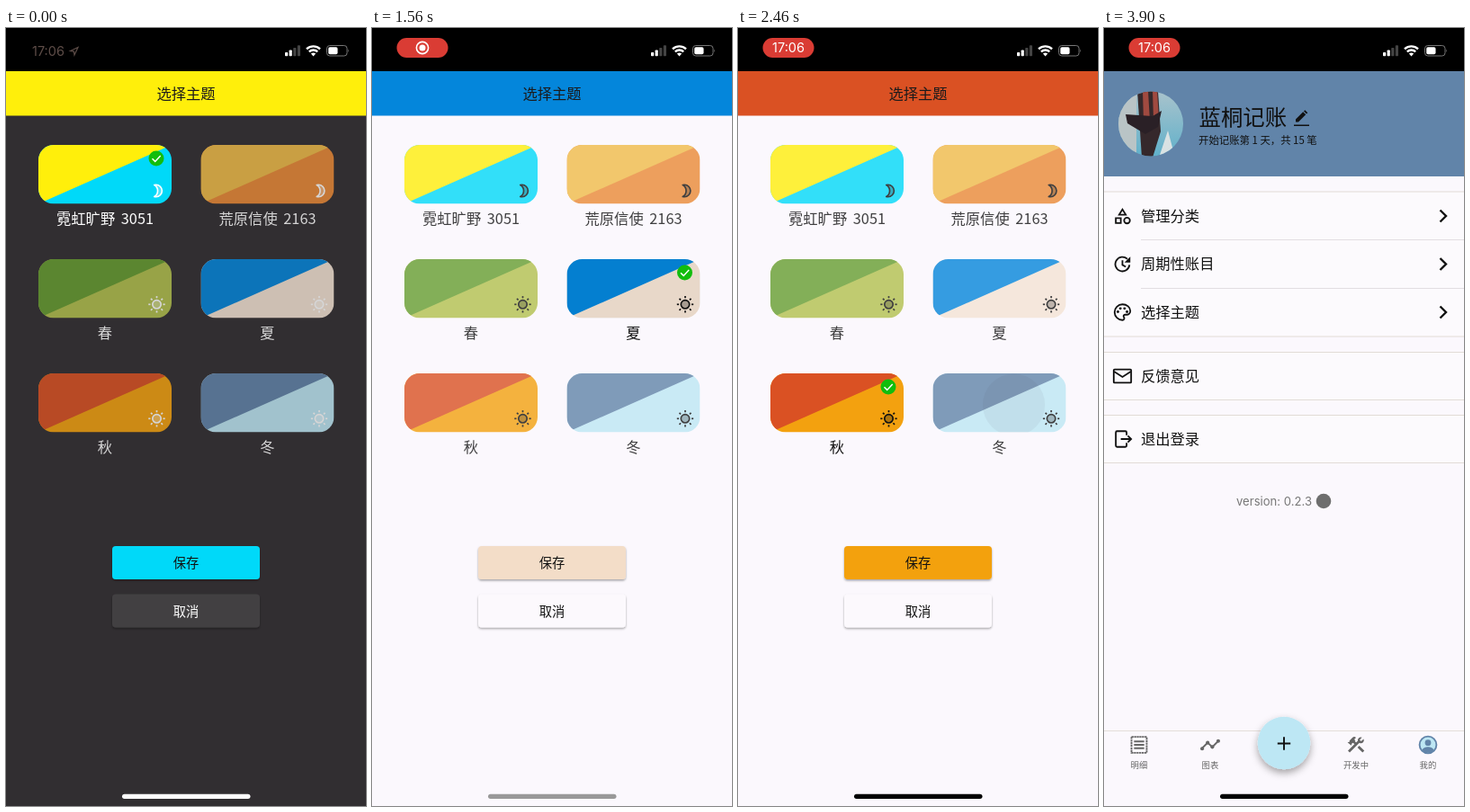
These frames come from a looping animation (400 px wide and 865 px high, 3960 ms). An HTML page:

```html
<!DOCTYPE html>
<html lang="zh-CN">
<head>
<meta charset="utf-8">
<title>选择主题</title>
<style>
html, body { margin: 0; width: 100%; height: 100%; overflow: hidden; background: #000; }
svg { display: block; width: 100%; height: 100%; }
text { font-family: "Noto Sans CJK SC", "Noto Sans CJK", "Noto Sans", sans-serif; font-size: 16.3px; }
.latin { font-family: Inter, Roboto, sans-serif; }
.mid { text-anchor: middle; }
.tile text { word-spacing: 3px; }
.btn { font-size: 14.3px; font-weight: 500; }
.tab { font-size: 9.4px; fill: #666; }
.icon { fill: none; stroke: currentColor; stroke-width: 2; }
.icon .solid { fill: currentColor; stroke: none; }
</style>
</head>
<body>
<svg viewBox="0 0 400 865" preserveAspectRatio="none">
  <defs>
    <clipPath id="tileClip"><rect width="148" height="65.5" rx="17"/></clipPath>
    <clipPath id="saveClip"><rect x="118" y="576" width="164" height="37" rx="4"/></clipPath>
    <clipPath id="avatarClip"><circle cx="52" cy="106.5" r="36"/></clipPath>
    <linearGradient id="sky" x2="0" y2="1"><stop stop-color="#a9c3cc"/><stop offset="1" stop-color="#5fb0ca"/></linearGradient>
    <filter id="soft" x="-30%" y="-30%" width="160%" height="180%">
      <feDropShadow dx="0" dy="1.5" stdDeviation="1.2" flood-opacity=".35"/>
    </filter>
    <filter id="lift" x="-40%" y="-40%" width="180%" height="200%">
      <feDropShadow dx="0" dy="4" stdDeviation="4" flood-opacity=".35"/>
    </filter>
  </defs>

  <g id="home">
    <rect y="48" width="400" height="817" fill="#fbf8fd"/>
    <rect y="48" width="400" height="117" fill="#6184a9"/>
    <g clip-path="url(#avatarClip)">
      <rect x="16" y="70" width="72" height="74" fill="url(#sky)"/>
      <path d="M16 70h20v74H16z" fill="#b9c4c6"/>
      <path d="M37 70h23l3 45-9 29H42z" fill="#35282b"/>
      <path d="M43 70h6l2 34h-7zM54 70h5l2 32h-6z" fill="#a04a40"/>
      <path d="M24 96l30 2 10-6-4 18-14 8-20-12z" fill="#2a2026"/>
      <path d="M61 144l10-30 8 30z" fill="#d9e2e3"/>
    </g>
    <text x="105.5" y="107.5" style="font-size:24.4px" fill="#111">蓝桐记账</text>
    <path d="M213 104.500v-3l8.200-8.200 3 3-8.200 8.200zM222 92.500l1.300-1.300 3 3-1.300 1.300zM211 107.500h17v1.500h-17z" fill="#111"/>
    <text x="105" y="129" style="font-size:11.4px" fill="#111">开始记账第 1 天，共 15 笔</text>
    <g id="menu"></g>
    <text x="147" y="531" class="latin" style="font-size:13.1px" fill="#777">version: 0.2.3</text>
    <circle cx="244" cy="526" r="8.300" fill="#6e6e6e"/>
    <path d="M0 781.500h400" stroke="#e4ded9"/>
    <g id="tabs"></g>
    <circle cx="200" cy="795" r="29.300" fill="#bde7f4" filter="url(#lift)"/>
    <path d="M192.800 795.500h14.400M200 788.300v14.400" stroke="#111" stroke-width="1.900"/>
  </g>

  <g id="picker">
    <rect id="bg" y="48" width="400" height="817"/>
    <rect id="bar" y="48" width="400" height="49.500"/>
    <text x="200" y="79" class="mid" fill="#1b1a1b">选择主题</text>
    <g id="tiles"></g>
    <rect id="save" x="118" y="576" width="164" height="37" rx="4" filter="url(#soft)"/>
    <circle id="saveInk" cx="205" cy="597" clip-path="url(#saveClip)"/>
    <text x="200" y="600" class="mid btn" fill="#111">保存</text>
    <rect id="cancel" x="118" y="629.500" width="164" height="37" rx="4" filter="url(#soft)"/>
    <text id="cancelText" x="200" y="653.500" class="mid btn">取消</text>
  </g>

  <rect id="homeBar" x="129" y="851.700" width="142.500" height="5.300" rx="2.650"/>

  <rect width="400" height="48"/>
  <g id="clock" fill="#5e4d48">
    <text x="29" y="31" class="latin" style="font-size:14.5px">17:06</text>
    <path d="M71.500 25.500l8.500-4-4 8.500-.6-3.900z" fill="none" stroke="#5e4d48" stroke-width="1.200"/>
  </g>
  <g id="pill">
    <rect id="pillBox" x="27.500" y="11" width="57" height="22" rx="11"/>
    <g id="record" fill="#fff">
      <circle cx="56" cy="22" r="6.600" fill="none" stroke="#fff" stroke-width="1.600"/>
      <circle cx="56" cy="22" r="3.500"/>
    </g>
    <text id="pillTime" x="56" y="27" class="latin mid" style="font-size:14.5px" fill="#fff">17:06</text>
  </g>
  <g fill="#fff">
    <rect x="310" y="27" width="3.200" height="4.200" rx=".8"/>
    <rect x="314.600" y="24.500" width="3.200" height="6.700" rx=".8"/>
    <rect x="319.200" y="22" width="3.200" height="9.200" rx=".8" fill="#444"/>
    <rect x="323.800" y="19.200" width="3.200" height="12" rx=".8" fill="#444"/>
    <g fill="none" stroke="#fff" stroke-width="2.300">
      <path d="M334 23.300a11 11 0 0 1 15 0M336.800 26.300a7 7 0 0 1 9.400 0"/>
    </g>
    <path d="M338.900 28.600a4 4 0 0 1 5.200 0l-2.600 2.900z"/>
    <rect x="356.500" y="19.500" width="22.500" height="11.500" rx="3.300" fill="none" stroke="#777"/>
    <rect x="358.200" y="21.200" width="10.300" height="8.100" rx="1.800"/>
    <path d="M380.300 23.500q1.600 1.700 0 3.500z" fill="#777"/>
  </g>
</svg>

<script>
const LOOP = 3960, STEP = 60;
const $ = id => document.getElementById(id);
const clamp = v => Math.max(0, Math.min(1, v));
const ramp = (t, from, length) => clamp((t - from) / length);

const theme = (name, primary, accent, dark) => ({
  name, primary, accent, dark,
  bg: dark ? '#312e31' : '#fbf8fd',
  card: dark ? '#434043' : '#fcf9fd',
  ink: dark ? '#ffffff' : '#111111',
  handle: dark ? '#ffffff' : '#000000'
});
const themes = [
  theme('霓虹旷野 3051', '#ffef0b', '#00d9f9', true),
  theme('荒原信使 2163', '#f0bc48', '#ea8a36', true),
  theme('春', '#669d30', '#b2c14d'),
  theme('夏', '#0486db', '#f4e4d4'),
  theme('秋', '#da5123', '#f3a10f'),
  theme('冬', '#6184a9', '#bde7f4')
];

// x and y are relative to the tapped tile
const taps = [
  { to: 1, down: 640, at: 780, x: 85, y: 33 },
  { to: 3, down: 1155, at: 1320, x: 98, y: 42 },
  { to: 2, down: 1580, at: 1680, x: 80, y: 36 },
  { to: 4, down: 1912, at: 1950, x: 109, y: 33 },
  { to: 5, down: 2430, at: 2520, x: 90, y: 35 }
];
const SAVE_DOWN = 3270, POP_AT = 3390, POP_TIME = 450;

const sunRays = Array.from({ length: 8 }, (_, i) =>
  `<path d="M0 -9.200v2.200" transform="rotate(${i * 45})"/>`).join('');
const sun = `<g transform="translate(131.5 50.3)" fill="none" stroke="currentColor" stroke-width="1.700">
  <circle r="4.700" fill="currentColor" fill-opacity=".3"/>${sunRays}</g>`;
const moon = `<path transform="translate(123.5 42) scale(.75)" fill="currentColor" fill-opacity=".3"
  stroke="currentColor" stroke-width="2.200" stroke-linejoin="round"
  d="M9.500 3c-1 0-1.700.1-2.500.3a10 10 0 0 1 0 17.400c.8.2 1.500.3 2.500.3a9 9 0 0 0 0-18z"/>`;

$('tiles').innerHTML = themes.map((th, i) => `
  <g class="tile" transform="translate(${i % 2 ? 216.5 : 36} ${130 + 127 * (i >> 1)})">
    <g clip-path="url(#tileClip)">
      <rect width="148" height="65.500" fill="${th.accent}"/>
      <path d="M0 0H148L0 65.500z" fill="${th.primary}"/>
      <circle class="ink"/>
    </g>
    ${th.dark ? moon : sun}
    <g class="check">
      <circle cx="131" cy="15" r="8.500" fill="#12bd0d"/>
      <path d="M126.500 15.200l3.200 3.200 6-6.300" fill="none" stroke="#fff" stroke-width="1.500"/>
    </g>
    <text x="74" y="88.300" class="mid" fill="currentColor">${th.name}</text>
  </g>`).join('');

const icon = (body, x, y, scale, color) =>
  `<g class="icon" color="${color}" transform="translate(${x} ${y}) scale(${scale}) translate(-12 -12)">${body}</g>`;
const dot = (x, y, r) => `<circle class="solid" cx="${x}" cy="${y}" r="${r}"/>`;

const rows = [
  ['管理分类', 209, '<path d="M12 4l-4 6.500h8zM4 14.500h6v6H4z"/><circle cx="17.500" cy="17.500" r="3.500"/>'],
  ['周期性账目', 262.5, '<path d="M20.500 13a8.600 8.600 0 1 1-2.600-7.200M12 7.500V13l4 2.300"/><path class="solid" d="M21.500 3v7h-7z"/>'],
  ['选择主题', 316, '<path d="M12 2.500a9.500 9.500 0 0 0 0 19a2.200 2.200 0 0 0 1.700-3.600a1.800 1.800 0 0 1 1.300-2.900H17a4.600 4.600 0 0 0 4.500-4.600C21.500 6 17.300 2.500 12 2.500z"/>'
    + dot(6.5, 11.5, 1.6) + dot(9.5, 7.5, 1.6) + dot(14.5, 7.5, 1.6) + dot(17.5, 11.5, 1.6)],
  ['反馈意见', 387, '<rect x="1.500" y="4" width="21" height="16" rx="1"/><path d="M2 6.500l10 6.500 10-6.500"/>'],
  ['退出登录', 457, '<path d="M17 7.500V4a1.500 1.500 0 0 0-1.500-1.500h-10A1.500 1.500 0 0 0 4 4v16a1.500 1.500 0 0 0 1.500 1.500h10A1.500 1.500 0 0 0 17 20v-3.500M10 12h12M18.500 8l4 4-4 4"/>']
];
const panel = (y, h) => `<rect x="-1" y="${y}" width="402" height="${h}" fill="#fcfafd" stroke="#e2dcd6"/>`;
$('menu').innerHTML = panel(182, 161) + panel(360.5, 53) + panel(430.5, 53)
  + '<path d="M41 235.500H400M41 289.500H400" stroke="#e2dee2"/>'
  + rows.map(([label, y, body], i) => icon(body, 20.5, y, .92, '#111')
    + `<text x="41" y="${y + 5.8}" fill="#111">${label}</text>`
    + (i < 3 ? `<path d="M373.500 ${y - 6.5}l6.500 6.500-6.500 6.500" fill="none" stroke="#111" stroke-width="2.400"/>` : '')
  ).join('');

const tabs = [
  ['明细', 39, '#666', '<path d="M3 2.500h18v19H3z" stroke-dasharray="2.500 .6"/><path d="M6 8h12M6 12h12M6 16h12"/>'],
  ['图表', 118, '#666', '<path d="M2.500 16l6.500-6.500 5.500 5L21.500 7.500"/>'
    + dot(2.5, 16.5, 2.2) + dot(9, 9.5, 2.2) + dot(14.5, 14.5, 2.2) + dot(21.5, 7.5, 2.2)],
  ['开发中', 280, '#666', '<path stroke-width="3" d="M3.500 20L15.500 8M14.800 14.100l6 6"/>'
    + '<path class="solid" d="M21 5l-3 2.700-1.600-1.600L19 3.300a3.600 3.600 0 0 0-4.800 4.400l2.200 2.200A3.600 3.600 0 0 0 21 5z"/>'
    + '<path class="solid" d="M2 9l2.700-.7-.5-1.200 3.600-3.600a3 3 0 0 1 4.200 0L9.900 5.600l1.400 1.400-.7.700 2 2-1.800 1.800-2.400-2-1.300.9-.7 2.300z"/>'],
  ['我的', 360, '#6184a9', '<circle cx="12" cy="12" r="10" fill="#bde7f4"/><circle class="solid" cx="12" cy="9.500" r="3.600"/><path class="solid" d="M5 18a8.500 8.500 0 0 1 14 0a9 9 0 0 1-14 0z"/>']
];
$('tabs').innerHTML = tabs.map(([label, x, color, body]) =>
  icon(body, x, 797, .94, color) + `<text x="${x}" y="823" class="mid tab">${label}</text>`).join('');

const tiles = [...document.querySelectorAll('.tile')].map(el => ({
  el, ink: el.querySelector('.ink'), check: el.querySelector('.check')
}));

const rgb = hex => [1, 3, 5].map(i => parseInt(hex.slice(i, i + 2), 16));
function blend(key, t, lag, length) {
  let color = rgb(themes[0][key]);
  for (const tap of taps) {
    const p = ramp(t, tap.at + lag, length), next = rgb(themes[tap.to][key]);
    color = color.map((c, i) => c + (next[i] - c) * p);
  }
  return `rgb(${color.map(Math.round)})`;
}

function drawInk(el, age, color) {
  el.setAttribute('r', age > 0 ? 25 + .32 * age : 0);
  el.setAttribute('fill', color);
  el.setAttribute('opacity', .11 * ramp(age, 0, 60) * (1 - ramp(age, 300, 200)));
}

function draw(t) {
  const selected = taps.reduce((now, tap) => t >= tap.at ? tap.to : now, 0);
  const ink = blend('ink', t, 0, 160);
  const fill = (id, color) => $(id).setAttribute('fill', color);

  fill('bg', blend('bg', t, 0, 160));
  fill('bar', blend('primary', t, 0, 160));
  fill('save', blend('accent', t, 120, 130));
  fill('cancel', blend('card', t, 60, 160));
  fill('cancelText', ink);
  fill('homeBar', blend('handle', t, 100, 350));
  drawInk($('saveInk'), t - SAVE_DOWN, '#000');

  tiles.forEach((tile, i) => {
    tile.el.setAttribute('opacity', i === selected ? 1 : .8);
    tile.el.setAttribute('color', ink);
    tile.check.setAttribute('visibility', i === selected ? 'visible' : 'hidden');
    const tap = taps.find(item => item.to === i);
    if (tap) {
      tile.ink.setAttribute('cx', tap.x);
      tile.ink.setAttribute('cy', tap.y);
    }
    drawInk(tile.ink, tap ? t - tap.down : 0, ink);
  });

  const pop = 1 - Math.pow(1 - ramp(t, POP_AT, POP_TIME), 3);
  $('picker').setAttribute('transform', `translate(${400 * pop} 0)`);
  $('home').setAttribute('transform', `translate(${-133 * (1 - pop)} 0)`);

  const glow = .5 + .5 * Math.cos((t - 1230) / 780 * 2 * Math.PI);
  fill('pillBox', `rgb(${Math.round(216 + 39 * glow)},${Math.round(60 + 5 * glow)},${Math.round(52 + 6 * glow)})`);
  $('clock').setAttribute('opacity', 1 - ramp(t, 0, 180));
  $('pill').setAttribute('opacity', ramp(t, 60, 300));
  const showTime = t >= 1830;
  $('record').setAttribute('visibility', showTime ? 'hidden' : 'visible');
  $('pillTime').setAttribute('visibility', showTime ? 'visible' : 'hidden');
}

const start = performance.now();
function tick() {
  const t = (performance.now() - start) % LOOP;
  draw(Math.floor(t / STEP) * STEP);
  requestAnimationFrame(tick);
}
tick();
</script>
</body>
</html>
```
